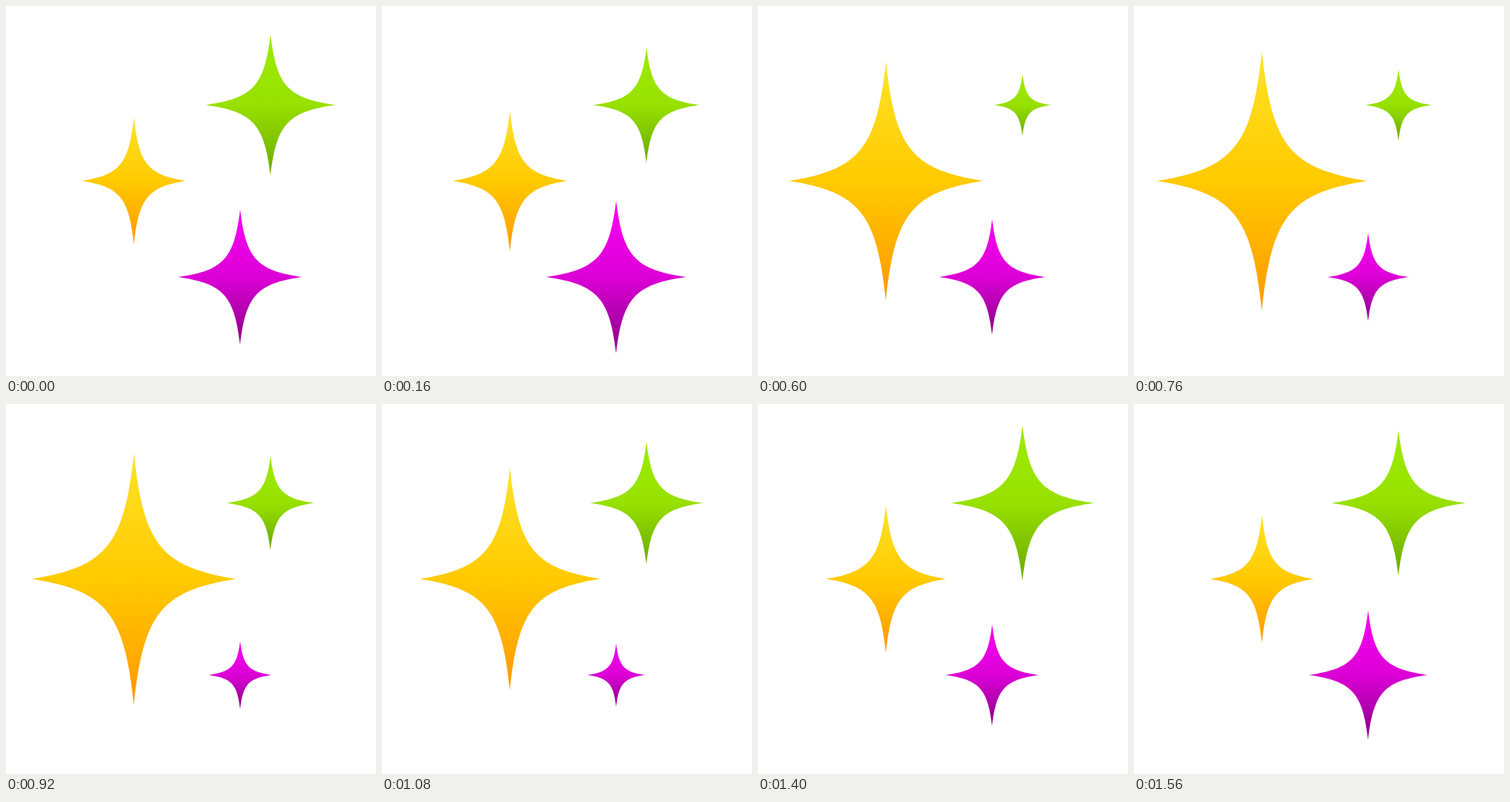
Recreate the animation shown at these times as an HTML page. Size 512x512 px, loop 1.6 s.

```html
<!DOCTYPE html>
<html lang="en">
<head>
<meta charset="utf-8">
<title>Sparkles</title>
<style>
  html, body { margin: 0; width: 100%; height: 100%; overflow: hidden; background: #fff; }
  svg { display: block; width: 100%; height: 100%; }
</style>
</head>
<body>
<svg id="stage" viewBox="0 0 512 512" xmlns="http://www.w3.org/2000/svg"></svg>
<script>
const LOOP = 1600;
const STEP = 40;

// min and max are half widths, ratio the half height over them, peak the time of full size
const stars = [
  { x: 177, y: 242, min: 71.4, max: 145.7, ratio: 1.235, peak: 800,
    colors: ['#ffe328', '#ffca00', '#ff9800'] },
  { x: 366, y: 137, min: 39.5, max: 98.8, ratio: 1.088, peak: 1400,
    colors: ['#9cec00', '#98e000', '#6aa900'] },
  { x: 324, y: 375, min: 39.7, max: 98.6, ratio: 1.09, peak: 240,
    colors: ['#f800f4', '#dc00d6', '#880086'] }
];

const stage = document.getElementById('stage');

function add(parent, name, attrs) {
  const el = document.createElementNS('http://www.w3.org/2000/svg', name);
  for (const key in attrs) el.setAttribute(key, attrs[key]);
  return parent.appendChild(el);
}

// Four concave arms in a unit box; A and B place the curve handles
const A = 0.095, B = 0.27;
const SHAPE = `M0-1C${A} ${-B} ${B} ${-A} 1 0C${B} ${A} ${A} ${B} 0 1` +
  `C${-A} ${B} ${-B} ${A} -1 0C${-B} ${-A} ${-A} ${-B} 0-1Z`;

stars.forEach((star, i) => {
  const grad = add(stage, 'linearGradient', { id: 'fill' + i, x1: 0, y1: 0, x2: 0, y2: 1 });
  star.colors.forEach((color, k) => add(grad, 'stop', { offset: k / 2, 'stop-color': color }));
  star.el = add(stage, 'path', { d: SHAPE, fill: `url(#fill${i})` });
});

const smooth = p => p * p * (3 - 2 * p);

function draw(time) {
  const t = Math.floor(time / STEP) * STEP % LOOP;
  for (const s of stars) {
    const gap = Math.abs(t - s.peak);
    const near = 1 - Math.min(gap, LOOP - gap) / (LOOP / 2);
    const rx = s.min + (s.max - s.min) * smooth(near);
    s.el.setAttribute('transform', `translate(${s.x} ${s.y}) scale(${rx} ${rx * s.ratio})`);
  }
}

const start = performance.now();
function tick() {
  draw(performance.now() - start);
  requestAnimationFrame(tick);
}
tick();
</script>
</body>
</html>
```
